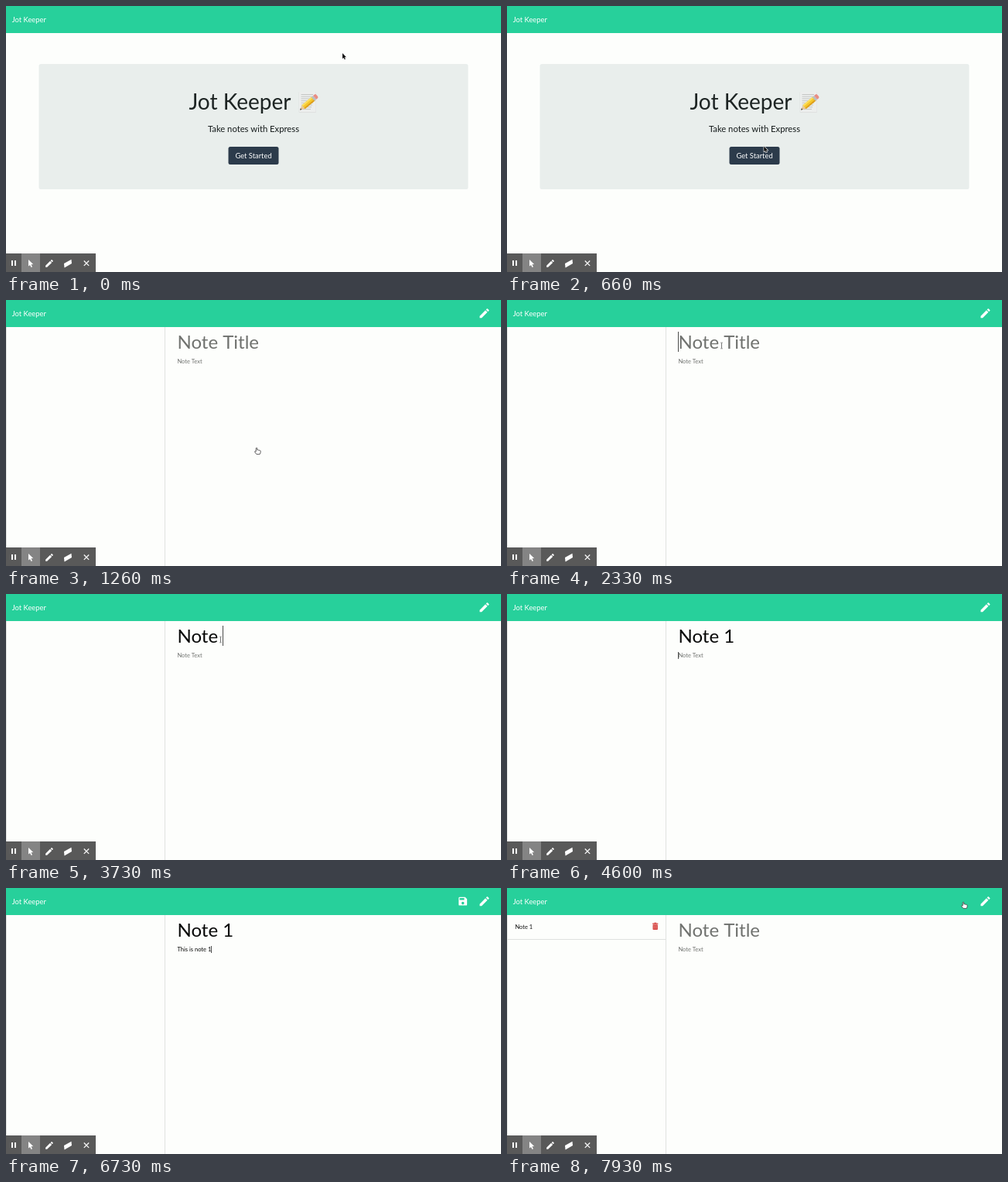
Recreate the animation shown at these times as an HTML page with a canvas. Size 640 by 344 pixels, loop 8000 ms.

```html
<!DOCTYPE html>
<html lang="en">
<head>
<meta charset="utf-8">
<title>Jot Keeper</title>
<style>
  html, body { margin: 0; width: 100%; height: 100%; overflow: hidden; background: #fdfefc; }
  canvas { display: block; width: 640px; height: 344px; }
</style>
</head>
<body>
<canvas id="stage" width="640" height="344"></canvas>
<script>
const ctx = document.getElementById('stage').getContext('2d');
const LOOP = 8000, STEP = 1000 / 15;
const APP = 'Jot Keeper';
const PAPER = '#fdfefc';

// Moments in ms
const PRESS = 930, OPEN = 1260, FOCUS = 2130, TAB = 4330, SAVABLE = 4930, SAVED = 7860;

const TITLE = { text: 'Note 1', keys: [3130, 3260, 3400, 3600, 3730, 4000] };
const BODY = {
  text: 'This is note 1',
  keys: [4860, 5000, 5060, 5200, 5330, 5530, 5600, 5730, 5930, 6060, 6260, 6330, 6460, 6730]
};

// Pointer path: time, x, y
const PATH = [
  [0, 435, 61], [800, 324, 191], [1540, 324, 191], [2200, 277, 59],
  [7070, 277, 59], [7470, 540, 26], [7670, 596, 14], [7800, 590, 18]
];

const ICON = {
  pencil: new Path2D('M3 17.25V21h3.75L17.81 9.94l-3.75-3.75L3 17.25zM20.71 7.04a1 1 0 0 0 0-1.41l-2.34-2.34a1 1 0 0 0-1.41 0l-1.83 1.83 3.75 3.75 1.83-1.83z'),
  save: new Path2D('M17 3H5a2 2 0 0 0-2 2v14a2 2 0 0 0 2 2h14a2 2 0 0 0 2-2V7l-4-4zm-5 16a3 3 0 1 1 0-6 3 3 0 0 1 0 6zm3-10H5V5h10v4z'),
  arrow: new Path2D('M0 0V7.2L1.6 5.7 2.7 8.2 3.9 7.7 2.8 5.3H5z'),
  hand: new Path2D('M-.8 .6Q0-.5.8.6V3Q1.8 2.5 2.4 3.2 3.3 2.8 3.9 3.6 4.9 3.4 5.1 4.3V6.2L4.2 8.4H-.2L-2.6 5.2Q-2.4 4-.8 5z')
};

function box(x, y, w, h, color, r = 0) {
  ctx.fillStyle = color;
  ctx.beginPath();
  ctx.roundRect(x, y, w, h, r);
  ctx.fill();
}

function poly(points, color) {
  ctx.fillStyle = color;
  ctx.beginPath();
  points.forEach(([x, y]) => ctx.lineTo(x, y));
  ctx.closePath();
  ctx.fill();
}

function line(x1, y1, x2, y2, color, width) {
  ctx.strokeStyle = color;
  ctx.lineWidth = width;
  ctx.beginPath();
  ctx.moveTo(x1, y1);
  ctx.lineTo(x2, y2);
  ctx.stroke();
}

function label(str, x, y, size, color, align = 'left') {
  ctx.font = `${size}px Lato, sans-serif`;
  ctx.textAlign = align;
  ctx.fillStyle = color;
  ctx.fillText(str, x, y);
}

// Draws a 24-unit icon around its centre
function icon(path, x, y, scale, color) {
  ctx.save();
  ctx.translate(x, y);
  ctx.scale(scale, scale);
  ctx.translate(-12, -12);
  ctx.fillStyle = color;
  ctx.fill(path);
  ctx.restore();
}

function pointerAt(t) {
  const i = PATH.findIndex(p => p[0] > t);
  if (i < 0) return PATH[PATH.length - 1].slice(1);
  const [t0, x0, y0] = PATH[i - 1], [t1, x1, y1] = PATH[i];
  const u = (t - t0) / (t1 - t0), e = u * u * (3 - 2 * u);
  return [x0 + (x1 - x0) * e, y0 + (y1 - y0) * e];
}

function drawMemo() {
  box(378.5, 111, 22.5, 27, '#dfe1e0', 1);
  box(379, 111, 21.5, 26, '#eceeed', 1);
  for (let i = 0; i < 8; i++) {
    line(381.5, 114.5 + i * 2.7, 397 - (i * 5) % 4, 114.5 + i * 2.7, '#b3b5b4', 0.7);
  }
  ctx.save();
  ctx.translate(380, 134.5);
  ctx.rotate(-0.7);
  poly([[0, 0], [6, -3.2], [6, 3.2]], '#e8c79a');
  poly([[0, 0], [2.2, -1.2], [2.2, 1.2]], '#3b3b3b');
  box(6, -3.2, 17, 6.4, '#f6c72c');
  box(6, -3.2, 17, 2, '#fbdf62');
  box(6, 1.5, 17, 1.7, '#dd9d1d');
  box(22, -3.2, 3, 6.4, '#b9bfc1');
  box(25, -3.2, 4, 6.4, '#e98d83', [0, 2, 2, 0]);
  ctx.restore();
}

function drawHome(t, x, y) {
  const hover = x > 288 && x < 352 && y > 182 && y < 205;
  const pressed = t >= PRESS;
  box(42.5, 75, 555, 162, '#e9eeec', 2.5);
  label(APP, 236.5, 134.2, 28, '#1d2423');
  drawMemo();
  label('Take notes with Express', 320, 163.3, 11.25, '#151b1b', 'center');
  if (pressed) box(286, 180.5, 68, 26, '#8d989f', 3.5);
  box(287.5, 182, 65, 23, pressed ? '#18242a' : hover ? '#1e2b37' : '#2c3b4b', 2.5);
  label('Get Started', 320, 196.8, 9.375, '#fff', 'center');
}

function drawField(field, t, x, y, size, hint, focusAt, blurAt, caretTop, caretHeight) {
  const count = t < SAVED ? field.keys.filter(k => k <= t).length : 0;
  const typed = field.text.slice(0, count);
  label(typed || hint, x, y, size, typed ? '#050605' : '#70726f');
  if (t < focusAt || t >= blurAt) return;
  const since = t - (count ? field.keys[count - 1] : focusAt);
  if (since % 1060 < 530) {
    const cx = Math.round(x + ctx.measureText(typed).width - 0.4);
    box(cx, caretTop, 1, caretHeight, '#4a4b4a');
  }
}

function drawTrash() {
  const red = '#d6423f';
  box(188, 45.6, 7.4, 1.2, red, 0.4);
  box(190.2, 44.8, 3, 1.2, red, 0.4);
  box(188.5, 47.2, 6.4, 6.8, red, 0.8);
  [190, 191.7, 193.4].forEach(x => line(x, 48.3, x, 52.8, '#eeb0ad', 0.5));
}

function drawNotes(t) {
  box(0, 35, 1, 309, '#e2e4e2');
  box(205, 35, 1, 309, '#e0e2e0');
  if (t >= SAVED) {
    label('Note 1', 10.5, 53.2, 7.5, '#111');
    drawTrash();
    box(0, 66, 205, 1, '#dfe1df');
  }
  drawField(TITLE, t, 221.5, 62.8, 24, 'Note Title', FOCUS, TAB, 41, 26);
  drawField(BODY, t, 221.5, 82.3, 7.5, 'Note Text', TAB, SAVED, 75, 9);
  icon(ICON.pencil, 618.5, 17.2, 0.67, '#fff');
  if (t >= SAVABLE && t < SAVED) icon(ICON.save, 590.7, 17.2, 0.6, '#fff');
}

function drawToolbar() {
  box(0, 320, 116, 24, '#595959');
  box(20, 320, 24, 24, '#848484');
  box(7, 329, 2, 7, '#fff');
  box(11, 329, 2, 7, '#fff');
  poly([[29, 328], [29, 336.5], [31, 335], [32.6, 338], [34, 337.3], [32.5, 334.3], [35.2, 334]], '#fff');
  icon(ICON.pencil, 56, 333, 0.54, '#fff');
  poly([[75, 333], [84.5, 327.8], [85, 333], [75.5, 338.5]], '#fff');
  line(100.8, 329.5, 107.2, 335.9, '#fff', 1.2);
  line(107.2, 329.5, 100.8, 335.9, '#fff', 1.2);
}

function drawPointer(t, x, y) {
  const onButton = t < OPEN && y > 182;
  const onLink = t > 7600 && x > 584;
  const resting = t >= OPEN && t < 1600;
  if (t >= 4000 && t < 7130) return;
  ctx.save();
  ctx.translate(x, y);
  ctx.lineJoin = 'round';
  if (onButton || onLink || resting) {
    ctx.fillStyle = '#fff';
    ctx.strokeStyle = '#3a3a3a';
    ctx.lineWidth = 0.8;
    ctx.fill(ICON.hand);
    ctx.stroke(ICON.hand);
  } else if (t < OPEN || y < 35) {
    ctx.strokeStyle = '#fff';
    ctx.lineWidth = 1.2;
    ctx.stroke(ICON.arrow);
    ctx.fillStyle = '#111';
    ctx.fill(ICON.arrow);
  } else {
    line(0.5, -3.5, 0.5, 3.5, '#555', 0.8);
    line(-1, -3.8, 2, -3.8, '#777', 0.7);
    line(-1, 3.8, 2, 3.8, '#777', 0.7);
  }
  ctx.restore();
}

function draw(now) {
  const t = Math.floor((now % LOOP + 8) / STEP) * STEP;
  const [x, y] = pointerAt(t);
  box(0, 0, 640, 344, PAPER);
  box(0, 0, 640, 35, '#27d09b');
  label(APP, 7.8, 20.7, 9.375, '#fff');
  if (t < OPEN) drawHome(t, x, y);
  else drawNotes(t);
  drawToolbar();
  drawPointer(t, x, y);
}

const start = performance.now();
function frame() {
  draw(performance.now() - start);
  requestAnimationFrame(frame);
}
frame();
</script>
</body>
</html>
```
